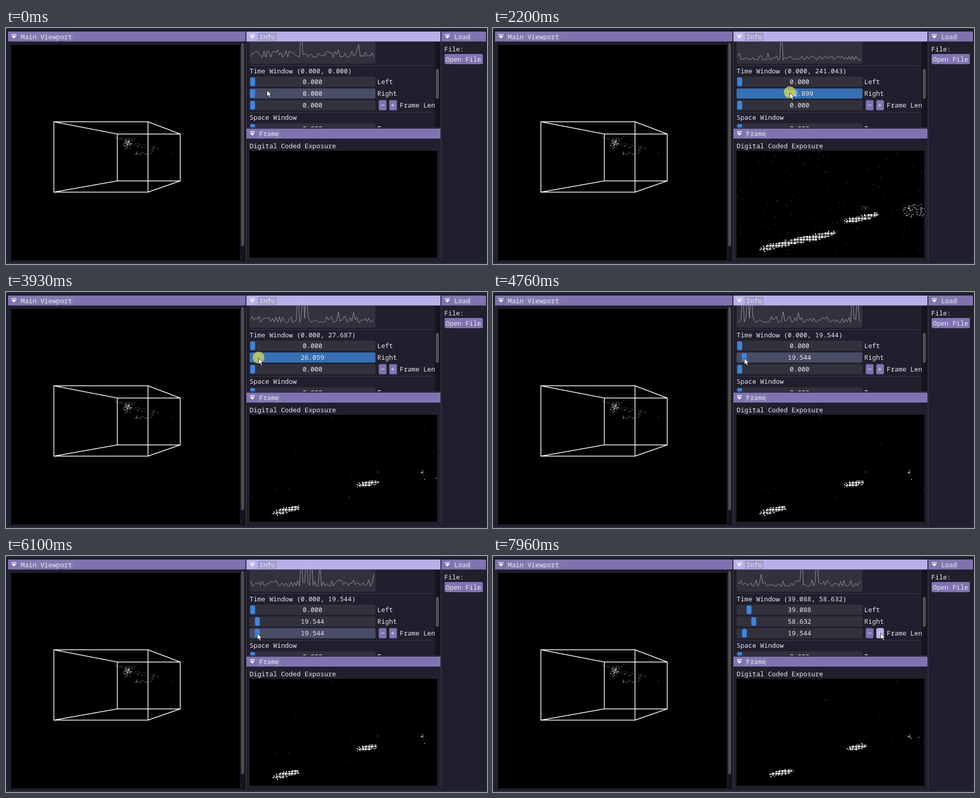
An HTML page for the animation above (8000 ms loop, 940 by 463 pixels).

```html
<!DOCTYPE html>
<html lang="en">
<head>
<meta charset="utf-8">
<title>Event viewer</title>
<style>
html, body { margin: 0; width: 100%; height: 100%; overflow: hidden; background: #201f2d; }
svg { display: block; width: 940px; height: 463px; }
text { font: 12.8px "Noto Sans Mono", "DejaVu Sans Mono", monospace; fill: #e9e9ec; white-space: pre; }
.value { text-anchor: middle; }
.bar { fill: #8173b1; }
.bar.focus { fill: #bab0e8; }
.tab { fill: #8486b0; opacity: .45; }
.rule { stroke: #3e3d4e; }
.thumb { fill: #4f4f50; }
.track { fill: #32323e; }
.track.hover { fill: #4a4d66; }
.track.active { fill: #3870b3; }
.grab { fill: #3d85e0; }
.button { fill: #8173b1; }
.button.hover { fill: #bab0e8; }
.wire { fill: none; stroke: #fff; stroke-width: 1.5; }
.crisp { shape-rendering: crispEdges; }
</style>
</head>
<body>
<svg id="stage" viewBox="0 0 940 463">
  <defs>
    <clipPath id="infoClip"><rect x="470" y="27" width="368" height="168"/></clipPath>
    <clipPath id="frameClip"><rect x="476" y="241" width="367" height="210"/></clipPath>
  </defs>
  <rect width="940" height="463" fill="#201f2d"/>
  <path class="rule" d="M0 .5H940M469.5 7V458M850.5 7V458M470 196H849M0 461.5H940"/>

  <g id="titles"></g>

  <rect x="458" y="27" width="10" height="430" fill="#14141d"/>
  <rect class="thumb" x="459.5" y="29" width="6" height="399" rx="3"/>
  <rect x="10" y="33" width="447" height="423" fill="#000"/>
  <path id="cloud" class="crisp" fill="#c3c3d6"/>
  <path class="wire" d="M93.5 184H277.5V322H93.5ZM217.5 208H340.5V300H217.5ZM93.5 184L217.5 208M277.5 184L340.5 208M277.5 322L340.5 300M93.5 322L217.5 300"/>

  <rect x="838" y="27" width="11" height="168" fill="#14141d"/>
  <rect class="thumb" x="840" y="80" width="6" height="59" rx="3"/>
  <g clip-path="url(#infoClip)">
    <rect class="track" x="476" y="0" width="246" height="70" rx="3"/>
    <path id="plot" fill="none" stroke="#97979a"/>
    <path class="rule" d="M476 73.5H832M476 165.5H832"/>
    <text id="window" x="476" y="89"></text>
    <text x="476" y="180">Space Window</text>
    <g id="sliders"></g>
    <rect class="button" x="728.5" y="141.5" width="15" height="20" rx="3"/>
    <rect id="plus" class="button" x="749" y="141.5" width="15" height="20" rx="3"/>
    <path stroke="#e9e9ec" d="M732.5 151.5h7M752.5 151.5h7M756 148v7"/>
  </g>

  <text x="476" y="235.5">Digital Coded Exposure</text>
  <rect x="476" y="241" width="367" height="210" fill="#000"/>
  <g clip-path="url(#frameClip)" class="crisp">
    <path id="specks" fill="#8a8a8a"/>
    <path id="trails" fill="#fff"/>
  </g>

  <text x="856.5" y="45.5">File:</text>
  <rect class="button" x="857" y="51" width="75" height="20" rx="3"/>
  <text x="859.5" y="66">Open File</text>

  <g id="cursor">
    <circle id="press" cy="-1" r="11.5" fill="#dedb50" opacity=".72"/>
    <path d="M0 0V12.5L3 9.8L5 14.3L7.2 13.3L5.2 9H9Z" fill="#fff" stroke="#000" stroke-width=".8"/>
  </g>
</svg>
<script>
const LOOP = 8000, LAG = 85, TICK = 33;
const UNIT = 19.544 / 12;          // slider value per step
const STEP_PX = .765, SLIDER_X = 482;
const $ = id => document.getElementById(id);
const clamp = (v, lo, hi) => Math.min(hi, Math.max(lo, v));

function make(parent, tag, attrs, content = '') {
  const node = document.createElementNS('http://www.w3.org/2000/svg', tag);
  for (const key in attrs) node.setAttribute(key, attrs[key]);
  node.textContent = content;
  return parent.appendChild(node);
}

function hash(a, b = 0) {
  let h = Math.imul(a + 101, 374761393) ^ Math.imul(b + 57, 668265263);
  h = Math.imul(h ^ (h >>> 13), 1274126177);
  h = Math.imul(h ^ (h >>> 16), 2246822519);
  return ((h ^ (h >>> 15)) >>> 0) / 4294967296;
}

function lerpKeys(keys, t, column = 1) {
  let i = 1;
  while (i < keys.length - 1 && keys[i][0] < t) i++;
  const a = keys[i - 1], b = keys[i];
  return a[column] + (b[column] - a[column]) * clamp((t - a[0]) / (b[0] - a[0]), 0, 1);
}

function titleBar(x, y, width, name, focus) {
  const g = $('titles');
  make(g, 'rect', { class: focus ? 'bar focus' : 'bar', x, y, width, height: 19.5 });
  make(g, 'rect', { class: 'tab', x: x + 22, y: y + 2, width: name.length * 7.7 + 6, height: 16 });
  make(g, 'path', { fill: '#f0f0f4', d: `M${x + 6.5} ${y + 5}h10v1.5h-10zM${x + 6.5} ${y + 8}h10l-5 6z` });
  make(g, 'text', { x: x + 25, y: y + 14.5 }, name);
}
titleBar(4, 7, 464, 'Main Viewport');
titleBar(470, 7, 379, 'Info', true);
titleBar(470, 197.5, 379, 'Frame');
titleBar(851, 7, 87, 'Load');

function slider(y, label, labelX = 725.5) {
  const g = $('sliders');
  const track = make(g, 'rect', { x: 476, y, width: 246, height: 20, rx: 3 });
  const grab = make(g, 'rect', { class: 'grab', y: y + 1.5, width: 9.5, height: 17, rx: 3 });
  const value = make(g, 'text', { class: 'value', x: 599, y: y + 14.5 });
  make(g, 'text', { x: labelX, y: y + 14.5 }, label);
  return (steps, state = '', text = (steps * UNIT).toFixed(3)) => {
    track.setAttribute('class', 'track ' + state);
    grab.setAttribute('x', SLIDER_X - 4.7 + steps * STEP_PX);
    value.textContent = text;
  };
}
const setLeft = slider(95.5, 'Left');
const setRight = slider(118.5, 'Right');
const setLength = slider(141.5, 'Frame Length', 769.5);
slider(187, 'Top')(0, '', '2.000');

// Point cloud in the 3D view
function drawCloud() {
  let d = '';
  const dot = (x, y) => d += `M${Math.round(x)} ${Math.round(y)}h1v1h-1z`;
  const spread = (i, k) => hash(i, k) + hash(i, k + 1) - 1;
  for (let i = 0; i < 95; i++) {
    const v = spread(i, 1);
    dot(238 + spread(i, 3) * 11 - v * 3, 225 + v * 12);
  }
  for (let i = 0; i < 22; i++) dot(250 + hash(i, 7) * 38, 243 + hash(i, 8) * 4);
  for (let i = 0; i < 24; i++) {
    const u = hash(i, 9);
    dot(251 + u * 46, 229 + u * 9 + spread(i, 11) * 6);
  }
  for (let i = 0; i < 9; i++) dot(214 + i * 2.2, 211 + hash(i, 13) * 6);
  dot(323, 245);
  $('cloud').setAttribute('d', d);
}
drawCloud();

// Scrolling, self-scaling timing plot
const SAMPLE = 3.3, PLOT_X = 478;
const scroll = [[0, 0], [900, 97], [2200, 209], [3060, 290], [4760, 460], [6100, 584], [7960, 780], [8000, 784]];
const spikes = new Map([
  [577, 4.4], [688, 2], [771, 8], [744, 2], [947, 5.2], [955, 5.5], [963, 5.3], [1025, 2.1], [1054, 2],
  [1161, 5], [1172, 4.4], [1182, 5.2], [1196, 3.6], [1303, 2.2], [1381, 5.3], [1412, 5.2]
].map(([x, h]) => [Math.round((x - PLOT_X) / SAMPLE), h]));
const sample = i => spikes.get(i) ?? .62 + .85 * hash(i, 21) ** 1.7;

function drawPlot(t) {
  const first = Math.round(lerpKeys(scroll, t) / SAMPLE);
  const values = Array.from({ length: 74 }, (_, i) => sample(first + i));
  const top = Math.max(4, ...values);
  $('plot').setAttribute('d', 'M' + values.map((v, i) =>
    `${(PLOT_X + i * SAMPLE).toFixed(1)} ${(69 - 80 * v / top).toFixed(1)}`).join('L'));
}

// Exposure image: ellipses swept along their paths, plus stray events
const CELL = 2.4;
const movers = [
  { x: 541, y: 428.5, long: 25.5, wide: 6.8, tilt: -.22, speed: .455 },
  { x: 704, y: 375.3, long: 21.5, wide: 6.2, tilt: -.22, speed: .137 },
  { x: 813, y: 353.5, long: 6, wide: 4.5, tilt: -.1, speed: .01, thin: .4 }
];

function sweep(m, from, to) {
  const angle = Math.atan(m.tilt), c = Math.cos(angle), s = Math.sin(angle);
  const a0 = m.speed * from / c, a1 = m.speed * to / c;
  const x0 = m.x + m.speed * from - m.long, x1 = m.x + m.speed * to + m.long;
  const y0 = m.y + m.tilt * m.speed * to - 14, y1 = m.y + 14;
  let d = '';
  for (let i = Math.floor(x0 / CELL); i * CELL < x1; i++)
    for (let j = Math.floor(y0 / CELL); j * CELL < y1; j++) {
      const dx = i * CELL - m.x, dy = j * CELL - m.y;
      const along = dx * c + dy * s, across = dy * c - dx * s;
      const dist = Math.hypot((along - clamp(along, a0, a1)) / m.long, across / m.wide);
      if (hash(i, j) < (1 - dist) * 2.4 * (m.thin || 1))
        d += `M${(i * CELL).toFixed(1)} ${(j * CELL).toFixed(1)}h1.7v1.7h-1.7z`;
    }
  return d;
}

function scatter(count, seed, x, y, w, h, from, to, size = 1) {
  let d = '';
  for (let i = 0; i < count; i++) {
    const born = hash(i, seed) * 340;
    if (born >= from && born <= to)
      d += `M${Math.round(x + hash(i, seed + 1) * w)} ${Math.round(y + hash(i, seed + 2) * h)}h${size}v1h-${size}z`;
  }
  return d;
}

let shown = '';
function drawExposure(left, right) {
  const key = left + ':' + right;
  if (key === shown) return;
  shown = key;
  const from = left * UNIT, to = right * UNIT;
  const empty = right <= left;
  $('trails').setAttribute('d', empty ? '' : movers.map(m => sweep(m, from, to)).join('') +
    scatter(60, 61, 799, 346, 44, 24, from, to, 2));
  $('specks').setAttribute('d', empty ? '' :
    scatter(150, 31, 477, 242, 365, 207, from, to) +
    scatter(26, 41, 718, 349, 16, 8, from, to) +
    scatter(40, 51, 800, 346, 42, 24, from, to));
}

// Pointer path: time, x, y
const pointer = [
  [0, 510, 122], [280, 508, 128], [600, 510, 129], [782, 554.7, 130], [815, 563.1, 130], [900, 584, 130],
  [1050, 617, 130], [1200, 636, 129], [1350, 641, 129], [1600, 640, 128], [1800, 625, 128],
  [2082, 595.2, 127], [2115, 591.4, 127], [2200, 580, 127], [2500, 544, 128], [2750, 518, 129],
  [2942, 506.6, 129], [2975, 506.4, 129], [3060, 504, 129], [3600, 497, 129], [4150, 491.2, 130],
  [4800, 491.2, 130], [5250, 491.2, 152], [6150, 491.2, 152], [6400, 600, 154], [6640, 757.5, 151], [8000, 757.5, 151]
];
const DRAG = [300, 4450], LENGTH_DRAG = [5400, 5800], CLICKS = [6950, 7350];
const within = (t, [a, b]) => t >= a && t < b;

function draggedSteps(t) {
  const at = t - LAG;
  if (at < DRAG[0]) return 0;
  return Math.max(0, Math.round((lerpKeys(pointer, Math.min(at, 4300)) - SLIDER_X) / STEP_PX));
}

function draw(t) {
  const x = lerpKeys(pointer, t), y = lerpKeys(pointer, t, 2);
  const dragging = within(t, DRAG), sizing = within(t, LENGTH_DRAG);
  const clicking = CLICKS.some(c => within(t, [c, c + 130]));
  const shift = 12 * CLICKS.filter(c => t >= c + 40).length;
  const right = draggedSteps(t) + shift;
  const caption = draggedSteps(t - TICK) + shift;
  const hover = top => x < 722 && y >= top && y < top + 20 ? 'hover' : '';

  setLeft(shift);
  setRight(right, dragging ? 'active' : hover(118) || (t < 300 ? 'hover' : ''));
  setLength(t > LENGTH_DRAG[0] + LAG ? 12 : 0, sizing ? 'active' : hover(141));
  $('window').textContent = `Time Window (${(shift * UNIT).toFixed(3)}, ${(caption * UNIT).toFixed(3)})`;
  $('plus').classList.toggle('hover', x > 749);
  $('press').style.visibility = dragging || sizing || clicking ? 'visible' : 'hidden';
  $('cursor').setAttribute('transform', `translate(${x.toFixed(2)} ${y.toFixed(2)})`);
  drawPlot(t);
  drawExposure(shift, right);
}

const start = performance.now();
function tick() {
  draw((performance.now() - start) % LOOP);
  requestAnimationFrame(tick);
}
tick();
</script>
</body>
</html>
```
